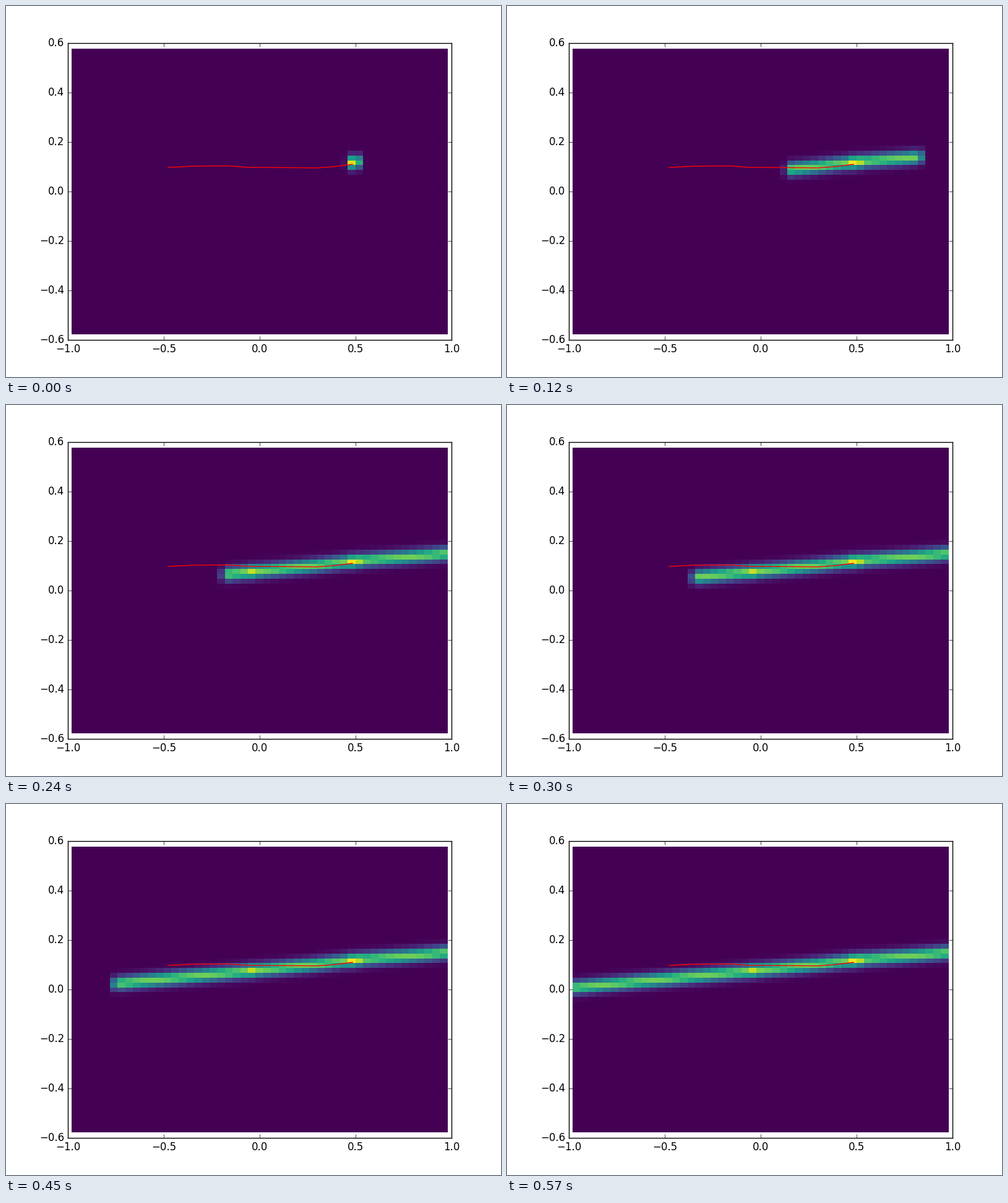
Animation of 800 by 600 pixels, one loop 0.72 s. Source, as a matplotlib script:

```python
import numpy as np
import matplotlib.pyplot as plt
from matplotlib.animation import FuncAnimation

plt.style.use("classic")
plt.rcParams["font.family"] = "DejaVu Sans"

FRAMES, LAST_STEP, INTERVAL = 24, 19, 30
COLS, ROWS = 49, 59
X_MAX, Y_MAX = 0.98, 1 / np.sqrt(3)
PX_X, PX_Y = 2 / 620, 1.2 / 480  # size of one pixel in data units
ROW_SIGMA, EDGE = 0.92, 0.17


def bump(x, centre, width):
    return np.exp(-((x - centre) / width) ** 2)


def soft_step(d):
    return 1 / (1 + np.exp(-np.clip(d / EDGE, -60, 60)))


def cell_edges(limit, count, pixel):
    """Even edges; inner ones snap down to the pixel below."""
    edges = np.linspace(-limit, limit, count + 1)
    edges[1:-1] -= pixel / 2
    return edges


def heat(step):
    """Ridge revealed from the bright cell outwards."""
    left = 35.97 - 2.035 * step
    right = 37.65 + 1.98 * step
    return band * soft_step(cols - left) * soft_step(right - cols)


cols = np.arange(COLS) + 0.5
x = (2 * cols / COLS - 1) * X_MAX
rows = np.arange(ROWS)[:, None] - ROWS // 2

# Slanted ridge with a gaussian cross-section and two bright spots
ridge = 0.5 + 3.72 * (x + 0.96) + 0.2 * bump(x, 0.52, 0.2)
gain = 0.78 + 0.26 * bump(x, 0.495, 0.03) + 0.13 * bump(x, -0.04, 0.03)
band = gain * np.exp(-((rows - ridge) / ROW_SIGMA) ** 2 / 2)

path_x = [-0.477, -0.34, -0.16, -0.06, 0.08, 0.30, 0.387, 0.484]
path_y = [0.0975, 0.1025, 0.1035, 0.0975, 0.097, 0.0955, 0.1005, 0.110]

fig = plt.figure(figsize=(8, 6), dpi=100, facecolor="white")
ax = fig.add_axes([0.125, 0.1, 0.775, 0.8])
mesh = ax.pcolormesh(cell_edges(X_MAX, COLS, PX_X), cell_edges(Y_MAX, ROWS, PX_Y),
                     heat(0), cmap="viridis", vmin=0, vmax=1)
ax.plot(path_x, path_y, color="red", lw=1.0)
ax.set_xlim(-1, 1)
ax.set_ylim(-0.6, 0.6)
ax.set_xticks(np.linspace(-1, 1, 5))
ax.set_yticks(np.linspace(-0.6, 0.6, 7).round(1))


def update(i):
    mesh.set_array(heat(min(i, LAST_STEP)))
    return (mesh,)


anim = FuncAnimation(fig, update, frames=FRAMES, interval=INTERVAL, repeat=True)
plt.show()
```
